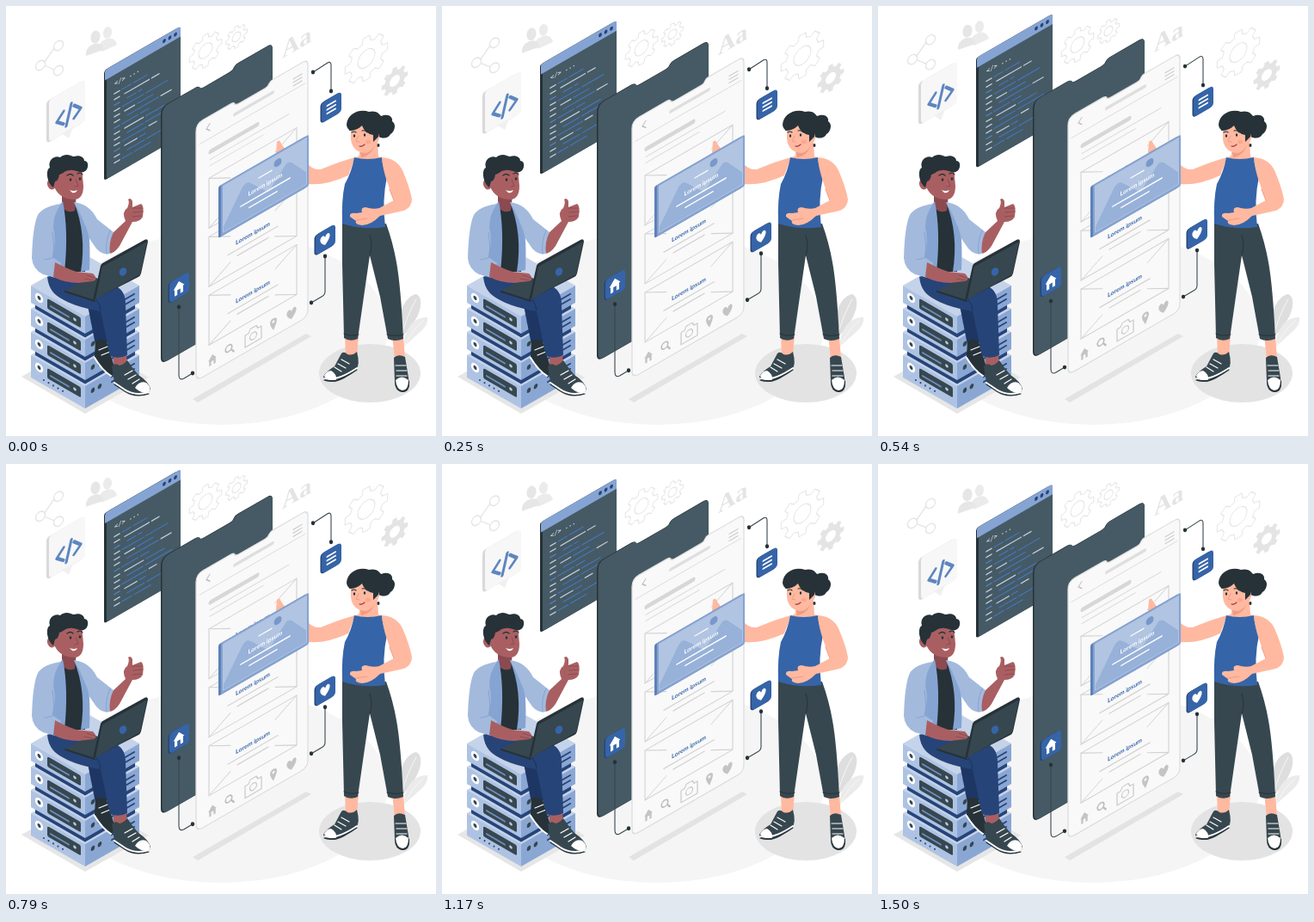
An HTML page with a canvas that plays this animation: 500x500 px, repeating every 1.54 s.

```html
<!DOCTYPE html>
<html>
<head>
<meta charset="utf-8">
<style>
html, body { margin: 0; width: 100%; height: 100%; overflow: hidden; background: #fff; }
canvas { display: block; width: 500px; height: 500px; }
</style>
</head>
<body>
<canvas id="stage"></canvas>
<script>
const canvas = document.getElementById('stage');
const ctx = canvas.getContext('2d');
const ratio = window.devicePixelRatio || 1;
canvas.width = canvas.height = 500 * ratio;

const LOOP = 1540, SLOPE = 0.577;
const INK = '#263238', SLATE = '#37474f', STEEL = '#455a64';
const BLUE = '#3664a8', NAVY = '#264478', SKY = '#a3badd', MID = '#86a4d2';
const PALE = '#e4e4e4', GREY = '#d2d2d2';
const BROWN = '#a95f62', BROWN_DARK = '#8a4a50', PEACH = '#ffb9a0', PEACH_DARK = '#f39a83';

const fill = (d, color) => { ctx.fillStyle = color; ctx.fill(new Path2D(d)); };
const line = (d, color, width = 1) => {
  ctx.strokeStyle = color;
  ctx.lineWidth = width;
  ctx.stroke(new Path2D(d));
};
const oval = (x, y, rx, ry, color, turn = 0) => {
  ctx.beginPath();
  ctx.ellipse(x, y, rx, ry, turn, 0, 7);
  ctx.fillStyle = color;
  ctx.fill();
};
const ring = (x, y, r, color, width = 1) => {
  ctx.beginPath();
  ctx.arc(x, y, r, 0, 7);
  ctx.strokeStyle = color;
  ctx.lineWidth = width;
  ctx.stroke();
};
const box = (x, y, w, h, r, color) => {
  ctx.beginPath();
  ctx.roundRect(x, y, w, h, r);
  ctx.fillStyle = color;
  ctx.fill();
};
const text = (str, x, y, font, color, align = 'center') => {
  ctx.font = font;
  ctx.fillStyle = color;
  ctx.textAlign = align;
  ctx.textBaseline = 'middle';
  ctx.fillText(str, x, y);
};
const at = (x, y, draw, skew = -SLOPE) => {
  ctx.save();
  ctx.transform(1, skew, 0, 1, x, y);
  draw();
  ctx.restore();
};
const raised = (height, draw) => at(0, -height, draw, 0);

// Rises for half the loop, then falls along the same curve.
function lift(time) {
  const half = LOOP / 2;
  const ease = x => x + 0.75 * x * x * (1 - x);
  return time < half ? ease(time / half) : 1 - ease(time / half - 1);
}

const LABEL = 'bold 7px Lato, sans-serif';
const HEART = 'M0,6 C-8,0 -6,-6 -3,-6 Q-1,-6 0,-3 Q1,-6 3,-6 C6,-6 8,0 0,6Z';
const HOUSE = 'M-6.5,0 L0,-7.5 L6.5,0 H5 V7.5 H1.8 V2 H-1.8 V7.5 H-5 V0Z';

function gear(x, y, r, hole, teeth, color, solid) {
  at(x, y, () => {
    const step = Math.PI * 2 / teeth;
    ctx.beginPath();
    for (let i = 0; i < teeth; i++)
      [[-.32, .77], [-.2, 1], [.2, 1], [.32, .77]].forEach(([a, k]) =>
        ctx.lineTo(r * k * Math.cos((i + a) * step), r * k * Math.sin((i + a) * step)));
    ctx.closePath();
    if (solid) {
      ctx.fillStyle = color;
      ctx.fill();
      oval(0, 0, hole, hole, '#fff');
    } else {
      ctx.strokeStyle = color;
      ctx.lineWidth = 1;
      ctx.stroke();
      ring(0, 0, hole, color);
    }
  });
}

function floor() {
  oval(250, 375, 194, 112, '#f5f5f5');
  oval(423, 427, 59, 34, '#e3e3e3');
  fill('M18,431 L92,389 L166,432 L92,474Z', '#e6e6e6');
  fill('M217,457 L349,381 L355,384 L223,461Z', '#e3e3e3');
  fill('M459,386 C452,360 464,337 477,335 C488,340 482,365 459,386Z', '#dedede');
  fill('M463,396 C462,376 475,361 490,362 C492,374 478,381 463,396Z', '#ebebeb');
  line('M459,386 Q466,360 477,341 M463,396 Q471,378 485,366', '#f7f7f7');
}

function backdrop() {
  line('M56,49 L45,65 M46,70 L56,74', PALE, 1.3);
  [[61, 46], [40, 69], [61, 75]].forEach(([x, y]) => at(x, y, () => ring(0, 0, 5.5, PALE, 1.3), -.3));
  oval(118, 31, 5, 7, '#ebebeb', .2);
  fill('M109,49 Q108,42 115,39 Q126,34 129,45 L112,53Z', '#ebebeb');
  oval(104, 36, 5.5, 7.5, '#e6e6e6', .2);
  fill('M93,58 Q92,49 100,45 Q110,41 113,48 L113,51Z', '#e6e6e6');
  gear(232, 52, 19, 8, 8, PALE);
  gear(268, 36, 12.5, 5, 8, PALE);
  gear(419, 61, 25, 10, 8, PALE);
  gear(452, 87, 15.5, 6, 8, '#e4e4e4', true);
  at(321, 61, () => {
    ctx.textBaseline = 'alphabetic';
    ctx.font = 'bold 28px "Liberation Serif", serif';
    ctx.textAlign = 'left';
    ctx.fillStyle = PALE;
    ctx.fillText('Aa', 0, 0);
  });
}

function codeWindow() {
  at(114, 75, () => {
    box(0, 0, 86, 128, 3, INK);
    box(3, 0, 86, 128, 3, STEEL);
    box(1, 0, 88, 12, [3, 3, 0, 0], '#86a4d3');
    [70, 76.5, 83].forEach(x => oval(x, 6, 1.9, 2.2, NAVY));
    text('</> ...', 12, 23, 'bold 7px "DejaVu Sans Mono", monospace', '#dce5ee', 'left');
    const ends = [50, 64, 44, 74, 57, 78, 52, 70, 79, 61, 48, 69, 54];
    ends.forEach((end, i) => {
      const y = 34 + i * 6.7, start = 21 + i % 3 * 3;
      const split = start + (end - start) * (.35 + i * 7 % 4 * .12);
      line(`M12,${y} h6`, i % 4 == 2 ? '#5580bf' : '#c3cfdd', 1.5);
      line(`M${start},${y} H${split}`, i % 3 == 1 ? '#c3cfdd' : '#4674b9', 1.4);
      line(`M${split + 3},${y} H${end}`, i % 4 == 1 ? '#c3cfdd' : '#4674b9', 1.4);
    });
  });
}

function speech() {
  at(47, 111, () => {
    box(0, 0, 43, 49, 4, '#d9d9d9');
    box(3, 0, 42, 49, 4, '#f7f7f7');
    fill('M18,48 H31 L26,58Z', '#f0f0f0');
    line('M20,23 L12,31 L20,38 M29,19 L23,42 M32,23 L40,31 L32,38', '#5e86c0', 3.4);
  });
}

const SHELL = 'M0,9 Q0,0 8,0 H40 Q44,0 45,3 Q46,5 50,5 H80 Q84,5 85,2 Q86,0 90,0 ' +
  'H124 Q130,0 130,7 V291 Q130,299 122,299 H8 Q0,299 0,291Z';

function placeholder(y) {
  line(`M15,${y} h102 v58 h-102Z`, GREY, 1.1);
  line(`M15,${y} l25,14 M117,${y} l-25,14 M15,${y + 58} l25,-14 M117,${y + 58} l-25,-14`, GREY);
  text('Lorem ipsum', 66, y + 25.5, LABEL, BLUE);
  line(`M37,${y + 34} h58 M48,${y + 41} h36`, GREY, 1.4);
}

function phone() {
  at(180, 118, () => {
    fill(SHELL, INK);
    ctx.translate(1.5, .7);
    ctx.scale(128.5 / 130, 298 / 299);
    fill(SHELL, STEEL);
  });
  at(221, 137, () => {
    fill(SHELL, '#f9f9f9');
    line(SHELL, '#dddddd', 1.3);
    line('M16,9 l-4,4 l4,4', '#bcbcbc', 1.2);
    line('M45,15 H89', '#dedede', 3.8);
    line('M113,13 h10 M113,17 h10 M113,21 h10', '#cccccc', 1.3);
    line('M4,26 H127', '#dcdcdc');
    line('M17,42 H71', '#d7d7d7', 5.2);
    line('M16,51 H108 M16,58 H78', '#dddddd', 1.2);
    [72, 140, 208].forEach(placeholder);
    at(19, 285, () => { ctx.scale(.75, .8); fill(HOUSE, '#c4c4c4'); }, 0);
    ring(38, 283, 3.8, '#bdbdbd', 1.6);
    line('M41,286 l3,4', '#bdbdbd', 1.8);
    line('M57,279 h4 l2,-4 h7 l2,4 h4 v14 h-19Z', '#c8c8c8', 1.2);
    ring(66.5, 285, 4, '#c8c8c8', 1.2);
    fill('M90,292 Q86,285 86,282 A4,4 0 0 1 94,282 Q94,285 90,292Z', '#c4c4c4');
    oval(90, 282, 1.5, 1.5, '#f9f9f9');
    at(111, 285, () => fill(HEART, '#c4c4c4'), 0);
  });
}

function tile(x, y, icon) {
  at(x, y, () => {
    box(-12.5, -12, 23, 24, 4, NAVY);
    box(-11, -12, 23, 24, 4, BLUE);
    icon();
  });
}

function callouts() {
  line('M357,77 L374,66 Q378,64 378,69 V99', SLATE, 1.1);
  line('M371,291 V332 Q371,336 367,338 L355,345', SLATE, 1.1);
  line('M201,350 V429 Q201,436 207,433 L217,427', SLATE, 1.1);
  [[357, 77], [378, 99], [371, 291], [355, 345], [201, 350], [217, 427]]
    .forEach(([x, y]) => oval(x, y, 2.2, 2.4, INK));
  tile(378, 118, () => line('M-4.5,-4.5 h9.5 M-4.5,0 h9.5 M-4.5,4.5 h9.5', '#fff', 2));
  tile(371, 272, () => fill(HEART, '#fff'));
  tile(201, 327.5, () => fill(HOUSE, '#fff'));
}

function card() {
  at(247, 210, () => {
    box(0, 0, 102, 60, 2, '#5d80b8');
    box(3, 0, 102, 60, 2, '#86a3d1');
    box(5, 2, 98, 55, 1, '#b1c4e1');
    fill('M6,56 V50 L28,17 Q32,12 37,17 L58,40 L78,20 Q81,17 85,21 L102,42 V56Z', '#97b1d8');
    oval(69, 12, 4.4, 4.4, '#7898cb');
    line('M47,17 H62', '#fff', 1.4);
    text('Lorem ipsum', 54.5, 29, LABEL, '#fff');
    line('M26,38 H83 M36,45 H68', '#fff', 1.7);
  });
}

function server(y, h) {
  fill(`M34,${y + h - 3} L92,${y + h + 30} L150,${y + h - 3} V${y + 27} L92,${y + 60.5} L34,${y + 27}Z`, NAVY);
  fill(`M29,${y} L92,${y - 36} L155,${y} L92,${y + 36}Z`, '#c5d3ea');
  fill(`M29,${y} L92,${y + 36} v${h} L29,${y + h}Z`, '#aec3e3');
  fill(`M92,${y + 36} L155,${y} v${h} L92,${y + 36 + h}Z`, '#8aa7d4');
  at(29, y, () => {
    oval(9.5, 9, 4.6, 5, '#fff');
    oval(9.5, 9, 2, 2.3, SLATE);
    box(19, 4, 39, 12, 2, SLATE);
    line('M23,11 h21', '#6d8fc2', 2);
    oval(51, 10, 1.8, 1.8, '#b9cae4');
  }, SLOPE);
  at(92, y + 36, () => {
    oval(9, 10, 2.3, 2.8, SLATE);
    oval(17, 10, 2.3, 2.8, SLATE);
    line('M31,7 H57 M31,13 H57', NAVY, 2);
  });
}

function servers() {
  [406, 379, 352, 325].forEach((y, i) => server(y, i ? 20 : 26));
  for (let i = 0; i < 5; i++) oval(44 + i * 5.5, 435 + i * 3.2, 1, 1.1, NAVY);
}

function man() {
  // far leg and shoe
  fill('M93,338 L116,345 L119,391 L104,394Z', '#1d3664');
  fill('M104,389 Q111,386 117,390 L126,420 Q128,430 121,430 Q110,421 103,408Z', INK);
  line('M103,409 Q112,424 122,430', '#fff', 2);
  line('M108,400 l10,-4 M111,406 l10,-4', '#fff', 1.2);
  // near leg and shoe
  fill('M125,402 L139,402 L142,419 L125,421Z', BROWN);
  fill('M48,315 C70,306 106,316 128,326 Q139,331 139,347 L141,406 Q131,411 121,407 L110,355 ' +
    'C92,352 66,345 55,333 Q49,326 48,315Z', NAVY);
  line('M110,354 Q109,340 94,334', '#183259', 1);
  fill('M123,419 Q127,414 132,418 Q137,417 141,412 Q147,421 154,429 Q166,437 168,445 ' +
    'Q167,453 156,453 Q143,453 137,445 L126,438Z', SLATE);
  fill('M150,444 Q155,435 163,438 Q169,443 167,448 Q160,453 150,444Z', '#fff');
  line('M126,438 L138,446 Q150,454 166,449', '#fff', 2);
  line('M126,440 L138,448 Q150,456 166,451', INK, 1.2);
  line('M138,429 l9,-5 M142,434 l9,-5 M147,439 l8,-5', '#fff', 1.3);

  // thumbs-up hand
  fill('M115,276 L124,264 L139,250 Q134,239 141,235 Q144,228 142,225 Q145,222 147,227 L147,234 ' +
    'L157,230 Q161,232 159,245 Q156,251 147,251 L132,279 Q126,288 119,288Z', BROWN);
  line('M147,235 L158,235 M148,240 L159,239 M147,245 L157,244', BROWN_DARK, .9);
  // torso
  fill('M65,231 L82,230 Q96,265 92,309 L62,309 Q59,265 65,231Z', INK);
  fill('M65,216 L82,220 L80,238 Q72,242 65,234Z', BROWN_DARK);
  fill('M79,228 C90,232 100,250 97,307 L87,309 Q94,265 79,228Z', MID);
  fill('M79,228 C92,230 100,236 106,248 L125,263 Q119,275 121,288 Q112,290 105,282 ' +
    'L96,269 Q92,250 79,228Z', SKY);
  line('M96,269 Q95,262 92,256 M121,261 Q115,275 117,288', MID, 1);
  fill('M66,227 Q53,240 54,263 L54,310 L68,309 Q73,262 66,227Z', MID);
  fill('M64,230 Q43,233 37,243 Q31,256 30,293 Q31,306 43,312 L57,316 Q61,306 64,299 ' +
    'L54,292 Q59,272 55,258 Q55,242 64,230Z', SKY);
  line('M54,263 Q57,283 54,293 L45,295', MID, 1);
  // head
  oval(53, 207, 5, 6.5, BROWN, -.2);
  fill('M55,190 Q69,178 88,188 L90,209 Q90,224 80,225 Q62,225 56,210Z', BROWN);
  fill('M55,211 C47,205 46,190 51,188 C48,179 57,173 63,176 C70,170 76,175 79,175 ' +
    'C86,173 91,176 91,180 C97,180 96,190 92,192 C87,196 80,189 74,191 C68,191 67,195 62,196 ' +
    'Q61,203 57,204Z', INK);
  oval(75, 202, 1.3, 1.8, INK);
  oval(86, 201, 1.3, 1.8, INK);
  line('M71,197 q4,-3 7,0 M83,195 q4,-2 6,1', INK, 1.3);
  line('M81,202 L84,209 L80,210', BROWN_DARK, 1);
  fill('M74,214 Q79,216 83,214 Q81,218 77,217Z', '#fff');
  // laptop and typing hand
  fill('M69,331 L102,315 L127,325 L103,342Z', SLATE);
  line('M69,332 L103,343', INK, 2);
  fill('M57,298 Q72,306 82,309 L101,311 Q108,318 101,320 L84,322 Q68,322 55,315Z', BROWN);
  line('M94,313 L103,316 M91,317 L101,319', BROWN_DARK, .9);
  fill('M101,342 L110,302 Q111,299 114,298 L161,272 Q165,270 165,274 L157,311 Q156,314 154,315 Z', INK);
  fill('M104,341 L112,303 L164,274 L156,312Z', SLATE);
  oval(136, 309, 4, 5, BLUE, .5);
}

function woman() {
  // legs
  fill('M394,382 h16 l-2,26 h-13Z M449,383 h13 l2,28 h-12Z', PEACH);
  fill('M391,251 Q415,258 442,253 Q450,275 454,298 Q459,325 462,387 Q452,391 444,387 L435,338 ' +
    'L423,290 Q420,310 409,387 Q400,391 393,386 L391,300Z', SLATE);
  line('M423,290 Q427,278 423,267 M393,381 Q402,385 410,382 M443,382 Q453,385 462,382', INK, 1);
  fill('M390,404 Q393,401 397,405 Q403,407 408,402 Q412,417 407,423 Q393,435 383,437 ' +
    'Q369,437 369,431 Q372,425 382,419Z', SLATE);
  fill('M370,430 Q373,424 378,424 Q385,428 384,435 Q371,436 370,430Z', '#fff');
  line('M370,433 Q384,437 408,421', '#fff', 1.8);
  line('M370,435 Q384,440 408,423', INK, 1.2);
  line('M386,416 l9,5 M382,420 l8,5 M390,411 l9,5', '#fff', 1.2);
  fill('M451,409 Q456,404 464,408 L468,432 Q470,448 461,449 Q452,448 452,437Z', SLATE);
  fill('M452,436 Q460,428 469,436 Q470,449 461,449 Q453,448 452,436Z', INK);
  fill('M453,435 Q460,428 468,435 Q468,447 461,447 Q454,446 453,435Z', '#fff');
  line('M453,418 h12 M454,424 h12 M454,430 h12', '#fff', 1.2);
  // arms and torso
  fill('M314,170 L315,158 Q318,154 320,160 L325,167 L350,183 Q357,191 366,190 ' +
    'Q390,180 406,176 L398,197 Q373,209 350,207 L318,182Z', PEACH);
  fill('M411,164 L432,158 L433,175 L442,179 Q420,192 401,179 L411,174Z', PEACH);
  fill('M412,169 Q423,169 429,160 Q426,174 413,176Z', PEACH_DARK);
  fill('M405,176 Q420,180 437,176 Q438,188 443,199 Q437,225 441,257 Q415,261 391,253 ' +
    'Q390,225 394,207 Q402,193 405,176Z', BLUE);
  fill('M437,176 Q454,177 461,191 Q470,212 472,225 Q471,237 458,239 L435,244 ' +
    'Q424,255 414,255 Q405,254 407,250 L400,245 Q399,240 407,241 L414,240 Q412,234 418,234 ' +
    'Q427,237 434,235 L451,226 L443,204 Q438,189 437,176Z', PEACH);
  line('M451,226 L446,213 M407,249 L420,247', PEACH_DARK, 1);
  // head
  fill('M410,139 C402,148 397,145 396,138 C397,125 411,119 422,123 C430,121 434,125 436,128 ' +
    'C447,124 450,131 449,134 C455,138 451,147 447,149 C444,155 437,154 433,152 L428,159Z', INK);
  fill('M401,144 Q413,134 427,144 Q435,146 434,154 Q432,160 429,160 Q427,169 418,171 ' +
    'Q403,170 401,155Z', PEACH);
  fill('M399,145 Q408,145 414,139 Q417,148 427,150 L427,158 L433,152 Q437,139 424,130 ' +
    'Q405,128 399,145Z', INK);
  oval(405, 151, 1.2, 1.7, INK);
  oval(417, 150, 1.2, 1.7, INK);
  line('M402,147 q3,-2 5,0 M414,145 q4,-1 6,2', INK, 1.1);
  line('M410,151 L407,157 L411,158', PEACH_DARK, 1);
  line('M411,163 Q414,164 417,161', '#a9414a', 1.3);
  oval(421, 158, 3, 2.2, '#ffa58d');
  oval(433, 162, 1.5, 2, INK);
}

function draw() {
  const p = lift(performance.now() % LOOP);
  ctx.setTransform(ratio, 0, 0, ratio, 0, 0);
  ctx.lineCap = ctx.lineJoin = 'round';
  ctx.fillStyle = '#fff';
  ctx.fillRect(0, 0, 500, 500);
  floor();
  raised(8.5 * p, backdrop);
  raised(18 * p, codeWindow);
  raised(26 * p, speech);
  raised(8.8 * p, phone);
  raised(8.5 * p, callouts);
  servers();
  man();
  woman();
  card();
  requestAnimationFrame(draw);
}
draw();
</script>
</body>
</html>
```
